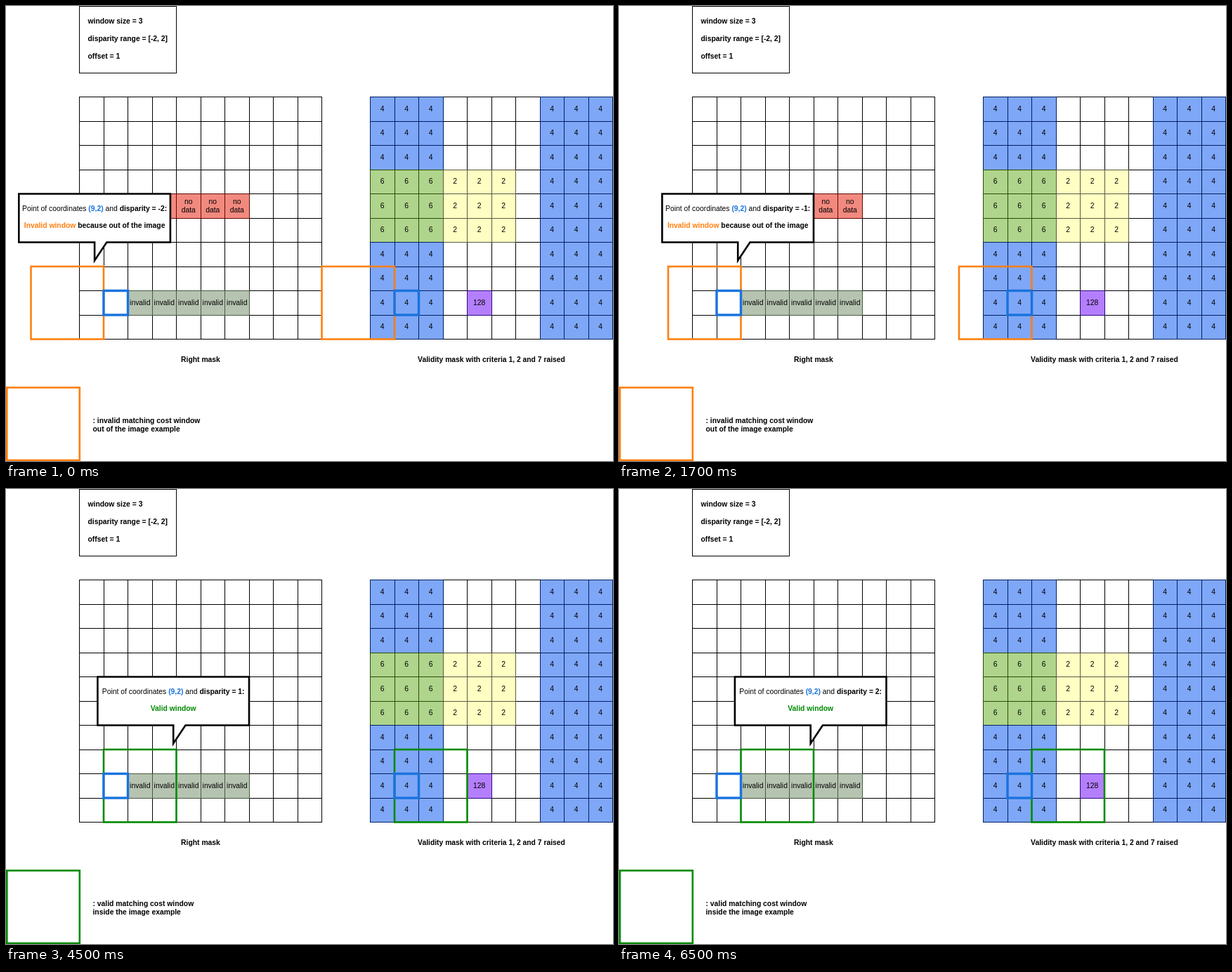
These frames come from a looping animation (864 by 648 pixels, 8 s). An HTML page:

```html
<!DOCTYPE html>
<html lang="en">
<head>
<meta charset="utf-8">
<title>Validity mask</title>
<style>
  html, body { margin: 0; width: 100%; height: 100%; overflow: hidden; background: #fff; }
  svg { display: block; width: 864px; height: 648px; }
  text { font: 10.35px "Liberation Sans", Arial, sans-serif; fill: #000; white-space: pre; }
  .mid { text-anchor: middle; }
  .bold { font-weight: bold; }
  .point { fill: #1a73de; }
  .step { opacity: 0; animation: 8s step-end infinite; }
  @keyframes step0 { 0% { opacity: 1 } 6.25%, 100% { opacity: 0 } }
  @keyframes step1 { 0% { opacity: 0 } 6.25% { opacity: 1 } 31.25%, 100% { opacity: 0 } }
  @keyframes step2 { 0% { opacity: 0 } 31.25% { opacity: 1 } 56.25%, 100% { opacity: 0 } }
  @keyframes step3 { 0% { opacity: 0 } 56.25% { opacity: 1 } 81.25%, 100% { opacity: 0 } }
  @keyframes step4 { 0% { opacity: 0 } 81.25%, 100% { opacity: 1 } }
</style>
</head>
<body>
<svg id="stage" viewBox="0 0 864 648"></svg>
<script>
const CELL = 34.5, TOP = 129.5, LEFT = 104.5, RIGHT = 518.5;
const WIN = 3 * CELL;
const ORANGE = '#ff7f0e', GREEN = '#008a00', BLUE = '#1a73de';

// [fill, line]
const paint = {
  blue: ['#7fa7f7', '#001f66'],
  green: ['#afd48b', '#2a4c0a'],
  yellow: ['#ffffc3', '#5a5c40'],
  red: ['#f2897f', '#5e0a05'],
  sage: ['#b6c3b1', '#475a40'],
  purple: ['#b47fff', '#2c0a80']
};

const snap = v => Math.floor(v) + 0.5;

const rect = (x, y, w, h, fill, stroke, width = 1) =>
  `<rect x="${x}" y="${y}" width="${w}" height="${h}" fill="${fill}" stroke="${stroke}" stroke-width="${width}"/>`;

const text = (x, y, body, cls = '') => `<text x="${x}" y="${y}" class="${cls}">${body}</text>`;

function grid(x0) {
  let d = '';
  for (let i = 0; i <= 10; i++) {
    d += `M${snap(x0 + CELL * i)} ${TOP - 0.5}v346`;
    d += `M${x0 - 0.5} ${snap(TOP + CELL * i)}h346`;
  }
  return `<path d="${d}" fill="none" stroke="#000"/>`;
}

function cell(x0, col, row, name, lines) {
  const x = snap(x0 + CELL * col), y = snap(TOP + CELL * row);
  const w = snap(x0 + CELL * (col + 1)) - x, h = snap(TOP + CELL * (row + 1)) - y;
  const base = Math.floor(150 + CELL * row) - 6 * (lines.length - 1);
  const cx = x0 + CELL * (col + 0.5);
  return rect(x, y, w, h, ...paint[name]) +
    lines.map((t, i) => text(cx, base + 12 * i, t, 'mid')).join('');
}

function leftMask() {
  let s = grid(LEFT);
  for (let c = 3; c <= 6; c++) s += cell(LEFT, c, 4, 'red', ['no', 'data']);
  for (let c = 2; c <= 6; c++) s += cell(LEFT, c, 8, 'sage', ['invalid']);
  return s;
}

function rightMask() {
  let s = grid(RIGHT);
  for (let r = 0; r < 10; r++) {
    const band = r >= 3 && r <= 5;
    for (let c = 0; c < 10; c++) {
      if (c < 3 && band) s += cell(RIGHT, c, r, 'green', ['6']);
      else if (c < 3 || c > 6) s += cell(RIGHT, c, r, 'blue', ['4']);
      else if (c < 6 && band) s += cell(RIGHT, c, r, 'yellow', ['2']);
    }
  }
  return s + cell(RIGHT, 4, 8, 'purple', ['128']);
}

function callout(x, disparity, valid) {
  const mid = x + 107.8;
  const verdict = valid
    ? `<tspan fill="${GREEN}">Valid window</tspan>`
    : `<tspan fill="${ORANGE}">Invalid window</tspan> because out of the image`;
  return `<path d="M${x} 267.5h215.6v69H${mid + 17.25}L${mid} 362.4V336.5H${x}z"
      fill="#fff" stroke="#000" stroke-width="2.6" stroke-miterlimit="10"/>` +
    text(mid, 292, 'Point of coordinates <tspan class="bold point">(9,2)</tspan> and ' +
      `<tspan class="bold">disparity = ${disparity}:</tspan>`, 'mid') +
    text(mid, 316, verdict, 'mid bold');
}

function step(i) {
  const disparity = i - 2, valid = disparity >= 0;
  const color = valid ? GREEN : ORANGE;
  const frame = (x, y) => rect(x, y, WIN, WIN, 'none', color, 2.6);
  const shift = CELL * disparity;
  const legend = valid
    ? [': valid matching cost window', 'inside the image example']
    : [': invalid matching cost window', 'out of the image example'];
  return `<g class="step" style="animation-name:step${i}">` +
    frame(LEFT + shift, 371) + frame(RIGHT + shift, 371) + frame(1.3, 543.4) +
    legend.map((t, k) => text(123.5, 594 + 12 * k, t, 'bold')).join('') +
    callout(i ? 26.9 + CELL * i : 18.3, disparity, valid) + '</g>';
}

const pointBox = x0 => rect(x0 + CELL, TOP + 8 * CELL, CELL, CELL, 'none', BLUE, 3.45);

document.getElementById('stage').innerHTML =
  rect(LEFT, 0.5, 138, 95, '#fff', '#000') +
  ['window size = 3', 'disparity range = [-2, 2]', 'offset = 1']
    .map((t, i) => text(116.5, 25 + 25 * i, t, 'bold')).join('') +
  leftMask() + rightMask() +
  text(277, 507, 'Right mask', 'mid bold') +
  text(691, 507, 'Validity mask with criteria 1, 2 and 7 raised', 'mid bold') +
  [0, 1, 2, 3, 4].map(step).join('') +
  rect(LEFT + CELL, TOP + 8 * CELL, CELL, CELL, '#fff', 'none') +
  pointBox(LEFT) + pointBox(RIGHT);
</script>
</body>
</html>
```
